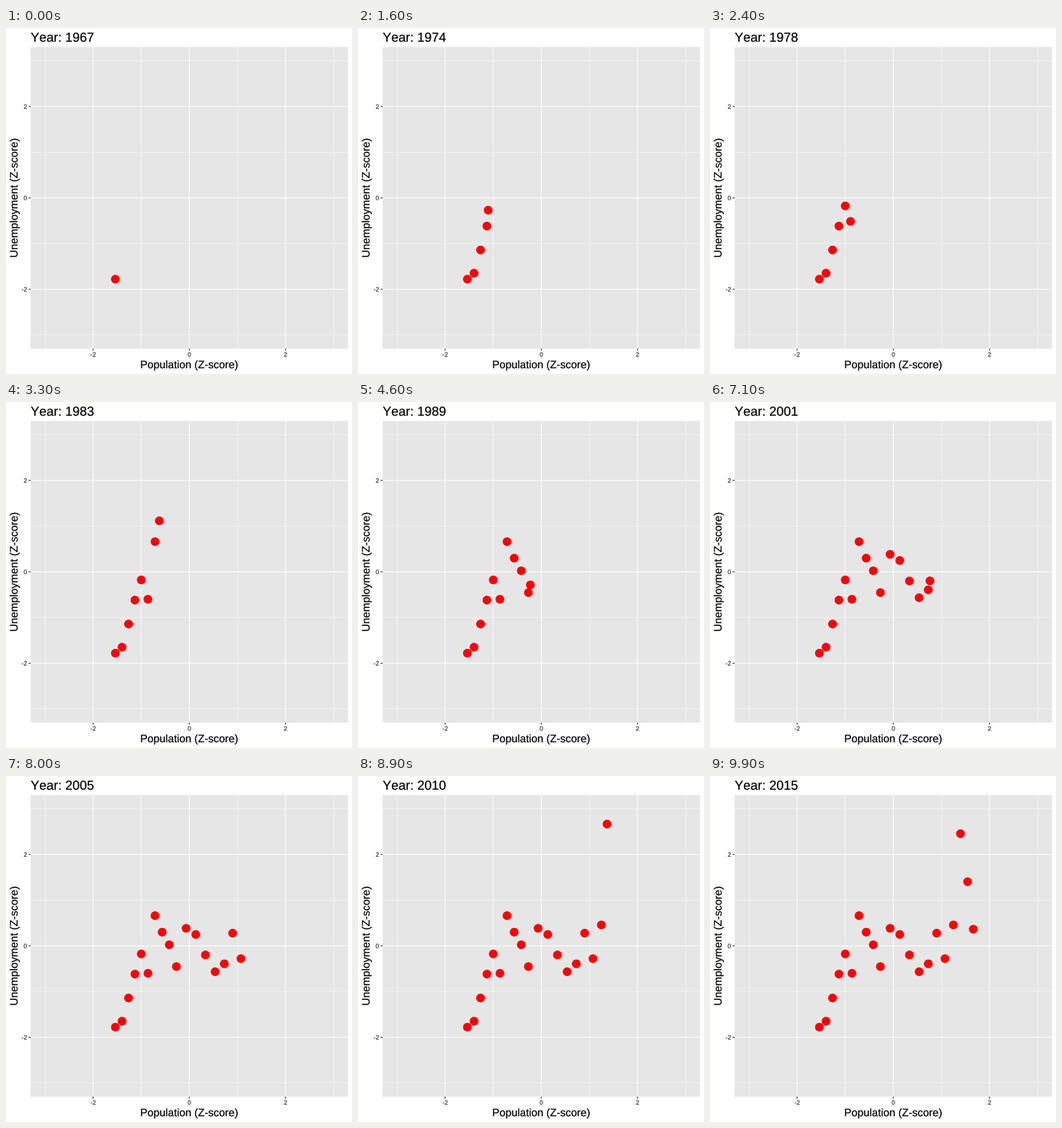
A matplotlib script that plays this animation: 480x480 px, repeating every 10 s.

```python
import numpy as np
import matplotlib.pyplot as plt
from matplotlib.animation import FuncAnimation
from matplotlib.patches import Circle, PathPatch, Rectangle
from matplotlib.textpath import TextPath
from matplotlib.transforms import Affine2D

plt.rcParams.update({"font.family": "Liberation Sans",
                     "text.kerning_factor": 6})

SIZE, DPI = 480, 72          # one point equals one pixel
FRAMES, INTERVAL, STEP = 100, 100, 5
FIRST, LAST = 1967, 2015
SPAN = LAST - FIRST
LEFT, RIGHT, TOP, BOTTOM = 34.2, 474.5, 26.4, 444.8
LIMIT = 3.3
RED, PANEL, TICK, TICK_TEXT = "#fb0207", "#e6e6e6", "#262626", "#3c3c3c"

# Turning points in millions, with straight runs between them
population = {1967: 199.2, 1971: 207.6, 1978: 222.6, 1989: 247.3,
              2000: 282.4, 2008: 304.8, 2015: 320.5}
unemployed = {1967: 3.01, 1969: 2.8, 1971: 5.03, 1973: 4.38, 1974: 5.17,
              1975: 7.94, 1979: 6.14, 1981: 8.28, 1982: 10.7, 1983: 10.7,
              1984: 8.53, 1987: 7.65, 1989: 6.53, 1992: 9.64, 1994: 7.98,
              2000: 5.65, 2003: 8.77, 2006: 6.99, 2007: 7.07, 2008: 8.95,
              2009: 14.3, 2010: 14.81, 2013: 11.46, 2015: 8.7}


def px(z):
    return (LEFT + RIGHT) / 2 + z * (RIGHT - LEFT) / (2 * LIMIT)


def py(z):
    return (TOP + BOTTOM) / 2 - z * (BOTTOM - TOP) / (2 * LIMIT)


def year_frame(year):
    return round((FRAMES - 1) * (year - FIRST) / SPAN + 1) - 1


def scores(points, mean, sd):
    frames = [year_frame(y) for y in points]
    values = np.interp(np.arange(FRAMES), frames, list(points.values()))
    return (values - mean) / sd


xs = px(scores(population, 257.5, 37.9))
ys = py(scores(unemployed, 7.736, 2.655))

fig = plt.figure(figsize=(SIZE / DPI, SIZE / DPI), dpi=DPI, facecolor="white")
ax = fig.add_axes([0, 0, 1, 1])
ax.set(xlim=(0, SIZE), ylim=(SIZE, 0))
ax.axis("off")


def line(x, y, color, width):
    ax.plot(x, y, color=color, lw=width, solid_capstyle="butt", snap=False)


def text_shape(x, y, text, size, align=0.0, angle=0):
    """Outline with its baseline at (x, y); align 0 left, 0.5 centre, 1 right."""
    path = TextPath((0, 0), text, size=size)
    shift = -align * path.get_extents().x1
    if align == 0.5:
        shift -= path.get_extents().x0 / 2
    move = Affine2D().translate(shift, 0).scale(1, -1).rotate_deg(angle)
    return move.translate(x, y).transform_path(path)


def label(*args, color="black", **kw):
    return ax.add_patch(PathPatch(text_shape(*args, **kw), fc=color, ec=color,
                                  lw=0.2, snap=False))


def dot(i):
    return ax.add_patch(Circle((xs[i], ys[i]), 6.05, fc=RED, lw=0, zorder=5))


ax.add_patch(Rectangle((LEFT, TOP), RIGHT - LEFT, BOTTOM - TOP,
                       fc=PANEL, lw=0, snap=False))
for values, width in (((-3, -1, 1, 3), 0.53), ((-2, 0, 2), 1.07)):
    for v in values:
        line([LEFT, RIGHT], [py(v)] * 2, "white", width)
        line([px(v)] * 2, [TOP, BOTTOM], "white", width)

for v in (-2, 0, 2):
    line([px(v)] * 2, [BOTTOM, BOTTOM + 2.75], TICK, 1.07)
    line([LEFT - 2.75, LEFT], [py(v)] * 2, TICK, 1.07)
    label(px(v), 456, str(v), 8.8, align=0.5, color=TICK_TEXT)
    label(28.9, py(v) + 3.2, str(v), 8.8, align=1, color=TICK_TEXT)

label(px(0), 472, "Population (Z-score)", 15, align=0.5)
label(16, py(0), "Unemployment (Z-score)", 15, align=0.5, angle=-90)
title = label(LEFT, 19, f"Year: {FIRST}", 18)

trail = [dot(i) for i in range(0, FRAMES, STEP)]
head = dot(0)


def update(frame):
    year = FIRST + frame * SPAN // (FRAMES - 1)
    title.set_path(text_shape(LEFT, 19, f"Year: {year}", 18))
    for n, mark in enumerate(trail):
        mark.set_visible(n * STEP < frame)
    head.center = xs[frame], ys[frame]
    return [title, head, *trail]


anim = FuncAnimation(fig, update, frames=FRAMES, interval=INTERVAL,
                     repeat=True, repeat_delay=0, blit=False)
plt.show()
```
